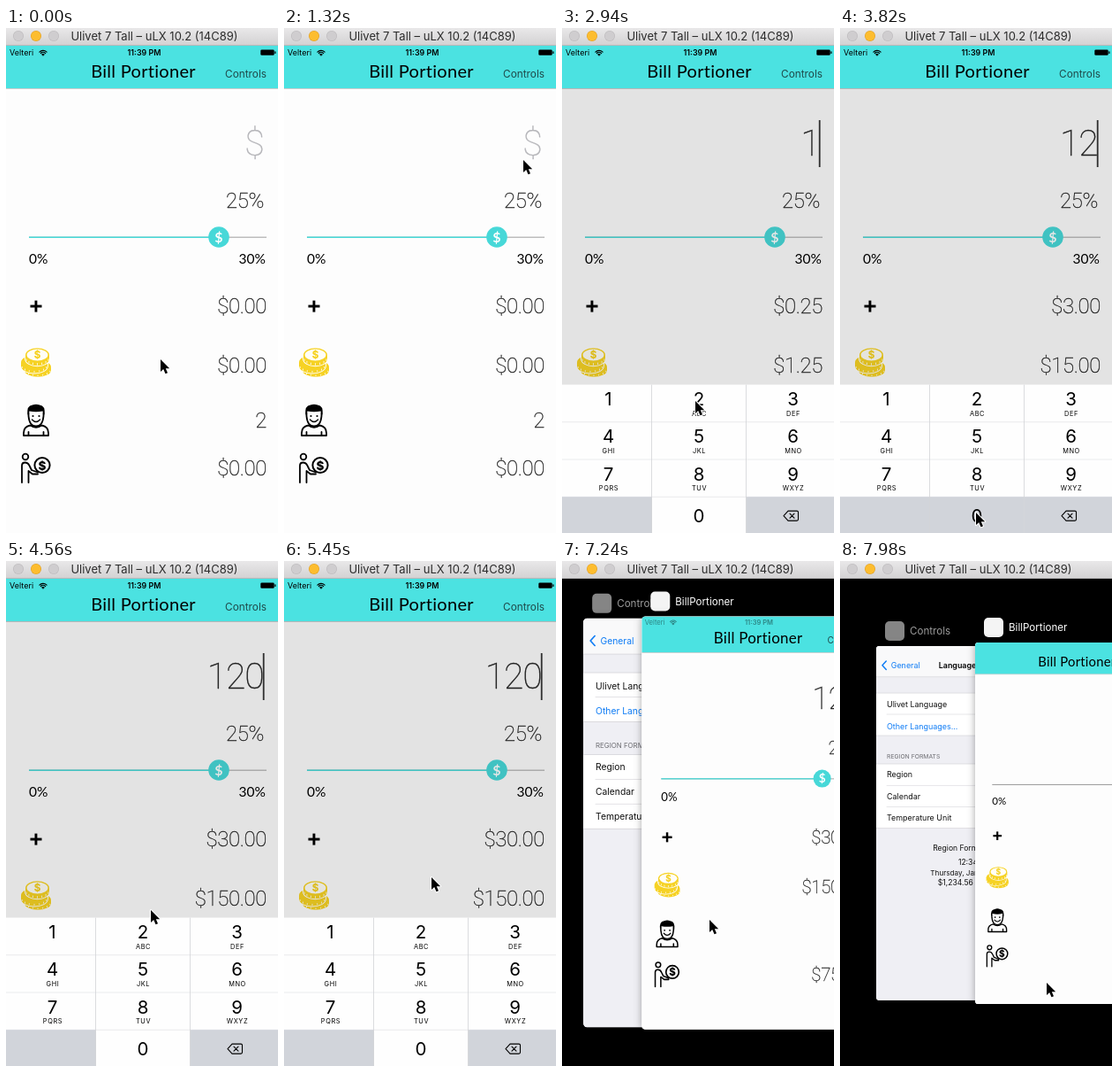
An HTML page with a canvas for the animation above (8000 ms loop, 308 by 570 pixels).

```html
<!DOCTYPE html>
<html lang="en">
<head>
<meta charset="utf-8">
<title>Bill Portioner</title>
<style>
  html, body { margin: 0; width: 100%; height: 100%; overflow: hidden; background: #000; }
  canvas { display: block; width: 308px; height: 570px; }
</style>
</head>
<body>
<canvas id="stage"></canvas>
<script>
const W = 308, H = 570, LOOP = 8000;
const APP = 'Bill Portioner', PREFS = 'Controls';
const TEAL = '#4be2e1', GOLD = '#f6d224', INK = '#000';
const canvas = document.getElementById('stage');
const ctx = canvas.getContext('2d');
const dpr = window.devicePixelRatio || 1;
canvas.width = W * dpr;
canvas.height = H * dpr;

const lato = (size, weight = 400) => `${weight} ${size}px Lato, sans-serif`;
const inter = (size, weight = 400) => `${weight} ${size}px Inter, sans-serif`;
const lerp = (a, b, p) => a + (b - a) * p;

// Linear interpolation through rows of [step, value, value, ...]
function track(k, rows) {
  if (k <= rows[0][0]) return rows[0].slice(1);
  for (let i = 1; i < rows.length; i++) {
    const a = rows[i - 1], b = rows[i];
    if (k <= b[0]) return a.slice(1).map((v, j) => lerp(v, b[j + 1], (k - a[0]) / (b[0] - a[0])));
  }
  return rows[rows.length - 1].slice(1);
}

const POINTER = [
  [0, 174, 373], [2, 176, 384], [3, 192, 360], [4, 225, 290], [5, 252, 225], [6, 265, 188],
  [8, 270, 165], [9, 270, 148], [11, 270, 148], [12, 255, 205], [13, 215, 345], [14, 176, 444],
  [15, 110, 438], [16, 62, 424], [17, 54, 420], [18, 54, 420], [20, 150, 420], [22, 153, 420],
  [24, 153, 530], [25, 153, 546], [28, 153, 546], [30, 160, 430], [32, 166, 356],
  [39, 166, 356], [43, 166, 404], [50, 166, 404], [51, 172, 411], [54, 233, 475]
];
const KEYBOARD = [[10, 0], [11, .7], [12, 1], [38, 1], [39, .45], [40, 0]];
const DIM = [[10, 0], [11, .5], [12, 1], [38, 1], [39, .6], [40, .15], [41, 0]];
const SWITCH = [[48, 0], [49, .59], [50, .93], [51, 1]];
const CARET = { 15: .6, 16: .2, 33: .6, 34: .2, 35: 0, 36: 0 };
const PRESSED = { 17: '1', 21: '2', 25: '0', 26: '0' };

const stepAt = t => t >= 7240
  ? 49 + Math.floor((t - 7240) / 148)
  : Math.min(48, Math.floor((t + 14) / 147.3));
const billAt = k => k < 18 ? '' : k < 22 ? '1' : k < 27 ? '12' : '120';

function text(s, x, y, font, color = INK, align = 'left', spacing = 0) {
  ctx.font = font;
  ctx.fillStyle = color;
  ctx.textAlign = align;
  ctx.letterSpacing = spacing + 'px';
  ctx.fillText(s, x, y);
}

// Hairline figures, right-aligned, firmed up with a faint outline
function figures(s, x, y, size, spacing, color = '#222') {
  text(s, x, y, `100 ${size}px Roboto, sans-serif`, color, 'right', spacing);
  ctx.strokeStyle = color;
  ctx.lineWidth = .3;
  ctx.strokeText(s, x, y);
}

function rect(x, y, w, h, color) {
  ctx.fillStyle = color;
  ctx.fillRect(x, y, w, h);
}

function disc(x, y, r, color) {
  ctx.fillStyle = color;
  ctx.beginPath();
  ctx.arc(x, y, r, 0, 7);
  ctx.fill();
}

function ring(x, y, r, width) {
  ctx.beginPath();
  ctx.arc(x, y, r, 0, 7);
  ctx.strokeStyle = INK;
  ctx.lineWidth = width;
  ctx.stroke();
}

function round(x, y, w, h, r, color) {
  ctx.fillStyle = color;
  ctx.beginPath();
  ctx.roundRect(x, y, w, h, r);
  ctx.fill();
}

function line(d, color, width) {
  ctx.strokeStyle = color;
  ctx.lineWidth = width;
  ctx.lineCap = ctx.lineJoin = 'round';
  ctx.stroke(new Path2D(d));
}

function shape(d, color) {
  ctx.fillStyle = color;
  ctx.fill(new Path2D(d));
}

function titleBar() {
  const g = ctx.createLinearGradient(0, 0, 0, 20);
  g.addColorStop(0, '#e9e8e9');
  g.addColorStop(1, '#d2d1d2');
  rect(0, 0, W, 20, g);
  rect(0, 19, W, 1, '#b9b8b9');
  ['#cfcdcf', '#fdbd2f', '#cfcdcf'].forEach((c, i) => {
    const x = 14 + i * 20;
    disc(x, 9, 6, i === 1 ? '#e0a127' : '#bcbabc');
    disc(x, 9, 5.4, c);
  });
  text('Ulivet 7 Tall – uLX 10.2 (14C89)', 168, 14, inter(13), '#2c2c2c', 'center');
}

function statusBar(alpha) {
  if (alpha <= 0) return;
  ctx.save();
  ctx.globalAlpha *= alpha;
  text('Velteri', 4, 31, inter(9));
  [2, 4, 6].forEach(r => {
    ctx.beginPath();
    ctx.arc(42, 31, r - .4, -Math.PI * .76, -Math.PI * .24);
    ctx.strokeStyle = INK;
    ctx.lineWidth = 1.2;
    ctx.stroke();
  });
  disc(42, 30.6, .9, INK);
  text('11:39 PM', 156.5, 31, inter(8.9, 600), INK, 'center');
  round(288.3, 24.4, 15.4, 6.4, 1.3, INK);
  round(304.3, 26.2, 1.2, 2.8, .5, INK);
  ctx.restore();
}

function coin(x, y, rx, ry, h) {
  ctx.beginPath();
  ctx.ellipse(x, y, rx, ry, 0, Math.PI, 0);
  ctx.lineTo(x + rx, y + h);
  ctx.ellipse(x, y + h, rx, ry, 0, 0, Math.PI);
  ctx.closePath();
  ctx.fillStyle = GOLD;
  ctx.strokeStyle = '#fff';
  ctx.lineWidth = 1.8;
  ctx.stroke();
  ctx.fill();
  for (let i = 1; i < 8; i++) {
    const a = Math.PI * i / 8;
    rect(x + rx * Math.cos(a) - .4, y + ry * Math.sin(a) + 1.4, .8, h - 2, '#fff');
  }
}

function coinsIcon() {
  coin(36, 382.5, 15, 7.5, 3.8);
  coin(32, 377.5, 15, 8, 4);
  coin(35.5, 369, 13.5, 7.8, 4.5);
  ctx.beginPath();
  ctx.ellipse(35.5, 369, 11.9, 6.4, 0, 0, 7);
  ctx.fillStyle = '#fffef6';
  ctx.fill();
  text('$', 35.5, 373.2, inter(11.5, 800), GOLD, 'center');
}

function personIcon() {
  line('M20 460V457Q20 450 27.500 448.500Q34 453 40.500 448.500Q48 450 48 457V460ZM25.500 459.500V456M42.500 459.500V456', INK, 1.8);
  line('M25.500 434V438Q26.500 449.500 34 449.500T42.500 438V434', INK, 1.8);
  shape('M24.500 437Q23 426 30 425.500Q34 424 38 425.500Q45 426 43.500 437L41.500 432.500Q34 434 26.500 432.500Z', INK);
  disc(30.5, 438, 1.1, INK);
  disc(37.5, 438, 1.1, INK);
  line('M29.500 442Q34 447 38.500 442', INK, 1.4);
}

function payerIcon() {
  ring(22, 484, 3.3, 1.8);
  line('M18 513V494Q18 490.500 21.500 490.500Q25 490.500 26.500 494L29 499L36 501.500M25.500 513V500L30 503.500H36', INK, 1.8);
  ring(41, 493.5, 8.6, 2);
  text('$', 41, 498.5, inter(13.5, 800), INK, 'center');
}

function slider(idle) {
  rect(26, 235.5, 269, 1.5, idle ? '#a2a2a2' : '#bdbdbd');
  if (idle) return;
  rect(26, 235.5, 215, 1.5, '#48d9d8');
  disc(241, 236, 11.8, '#47d8d8');
  text('$', 241, 241.6, lato(16, 700), '#fff', 'center');
}

const money = v => '$' + v.toFixed(2);
const amount = (s, y, x = 295) => figures(s, x, y, 24, -.4);

function app(k, status, idle) {
  rect(0, 20, W, 550, '#fdfdfd');
  rect(0, 20, W, 48, TEAL);
  rect(0, 68, W, .7, '#b4b8b8');
  statusBar(status);
  text(APP, 155.5, 56, lato(20), INK, 'center', .3);
  text(PREFS, 295, 56, inter(11.8), '#1f4a4a', 'right');

  const bill = billAt(k);
  figures(bill || '$', 291.5, 143.5, 41, -1.2, bill ? '#222' : '#b4b4b8');
  amount('25%', 203, 292);
  slider(idle);
  text('0%', 26, 266, lato(15.5));
  text('30%', 294, 266, lato(15.5), INK, 'right');

  rect(27.5, 312.6, 13, 2.9, INK);
  rect(32.5, 307.6, 2.9, 13, INK);
  coinsIcon();
  personIcon();
  payerIcon();
  const tip = bill * .25, total = bill * 1.25;
  amount(money(tip), 322);
  amount(money(total), 389);
  amount('2', 451);
  amount(money(total / 2), 505);
}

function keyboard(up, pressed) {
  if (!up) return;
  const GREY = '#d1d4da';
  const letters = ['', 'ABC', 'DEF', 'GHI', 'JKL', 'MNO', 'PQRS', 'TUV', 'WXYZ'];
  const mids = [52.5, 155, 261.5], edges = [0, 102, 208.5, W];
  ctx.save();
  ctx.translate(0, 402.6 + (1 - up) * 168);
  rect(0, 0, W, 168, '#fefefe');
  for (let i = 1; i < 4; i++) rect(0, i * 42.2 - .4, W, .8, '#e4e5e8');
  for (let i = 0; i < 12; i++) {
    const c = i % 3, row = Math.floor(i / 3), y = row * 42.2;
    const label = i < 9 ? String(i + 1) : i === 10 ? '0' : '';
    if (!label || label === pressed) rect(edges[c], y, edges[c + 1] - edges[c], 42.2, GREY);
    text(label, mids[c], row < 3 ? y + 23.6 : 155.4, inter(20.5), INK, 'center');
    if (letters[i]) text(letters[i], mids[c] + .5, y + 35.4, inter(7.4), INK, 'center', .6);
  }
  rect(101.2, 0, .8, 168, '#d3d4d8');
  rect(208, 0, .8, 168, '#d3d4d8');
  line('M251 148L256 142.500H266Q267.500 142.500 267.500 144V152Q267.500 153.500 266 153.500H256ZM258 145.500L263 150.500M263 145.500L258 150.500', INK, 1.1);
  ctx.restore();
}

function prefsPage() {
  const BLUE = '#0f7cf5', DARK = '#111', font = inter(12.3);
  rect(0, 0, W, 550, '#efeff4');
  rect(0, 0, W, 48, '#f9f9fa');
  rect(0, 73, W, 66, '#fff');
  rect(0, 183, W, 100, '#fff');
  [48, 73, 139, 183, 283].forEach(y => rect(0, y - .4, W, .7, '#c8c7cc'));
  [106, 216.3, 249.6].forEach(y => rect(16, y - .4, W, .7, '#d0cfd4'));
  line('M15.500 23.500L9.500 30L15.500 36.500', BLUE, 2);
  text('General', 23, 34.5, font, BLUE);
  text('Language & Region', 154, 34.5, inter(12.2, 600), INK, 'center');
  text('Ulivet Language', 16.5, 95, font, DARK);
  text('Other Languages...', 16.5, 129, font, BLUE);
  text('REGION FORMATS', 16.5, 174.5, inter(9.4), '#6d6d72');
  ['Region', 'Calendar', 'Temperature Unit'].forEach((s, i) => text(s, 16.5, 204 + i * 33.4, font, DARK));
  text('Region Format Example', 154, 318, inter(11.8), DARK, 'center');
  text('12:34 AM', 154, 340, inter(11.8), DARK, 'center');
  text('Thursday, January 5, 2017', 154, 356, inter(11.2), DARK, 'center');
  text('$1,234.56    4,567.89', 154, 372, inter(11.8), DARK, 'center');
}

function card(x, y, scale, draw) {
  ctx.save();
  ctx.translate(x, y);
  ctx.scale(scale, scale);
  ctx.shadowColor = 'rgba(0,0,0,.35)';
  ctx.shadowBlur = 9 * dpr;
  round(0, 0, W, 550, 5, '#fdfdfd');
  ctx.shadowColor = 'transparent';
  ctx.clip();
  draw();
  ctx.restore();
}

function cardLabel(name, x, y, iconColor, color) {
  round(x + 10, y - 28, 22, 22, 5, iconColor);
  text(name, x + 38, y - 12.8, inter(11.6), color);
}

function switcher(k, p) {
  rect(0, 20, W, 550, '#000');
  const backX = 41 * p, backY = 20 + 76 * p;
  const frontX = 153 * p, frontY = 20 + 72 * p;
  cardLabel(PREFS, backX, backY, '#858585', '#9a9a9a');
  card(backX, backY, 1 - .273 * p, prefsPage);
  cardLabel(APP.replace(' ', ''), frontX, frontY, '#f4f4f4', '#fff');
  card(frontX, frontY, 1 - .258 * p, () => {
    ctx.translate(0, -20);
    app(k, 1 - p, p === 1);
  });
}

function pointer(x, y) {
  ctx.save();
  ctx.translate(x, y);
  const d = 'M1 1V15L4.200 12L6.500 17.300L9 16.300L6.800 11.200H11.200Z';
  line(d, '#fff', 2);
  shape(d, INK);
  ctx.restore();
}

function draw(k) {
  ctx.setTransform(dpr, 0, 0, dpr, 0, 0);
  const [p] = track(k, SWITCH);
  if (p > 0) {
    switcher(k, p);
  } else {
    app(k, 1, false);
    if (k >= 11 && k <= 38) {
      ctx.globalAlpha = CARET[k] ?? 1;
      rect(290.8, 104, 1.8, 53, '#333');
      ctx.globalAlpha = 1;
    }
    rect(0, 68, W, 502, `rgba(0,0,0,${track(k, DIM)[0] * .1})`);
    keyboard(track(k, KEYBOARD)[0], PRESSED[k]);
  }
  titleBar();
  pointer(...track(k, POINTER));
}

const start = performance.now();
function tick() {
  draw(stepAt((performance.now() - start) % LOOP));
  requestAnimationFrame(tick);
}
tick();
</script>
</body>
</html>
```
